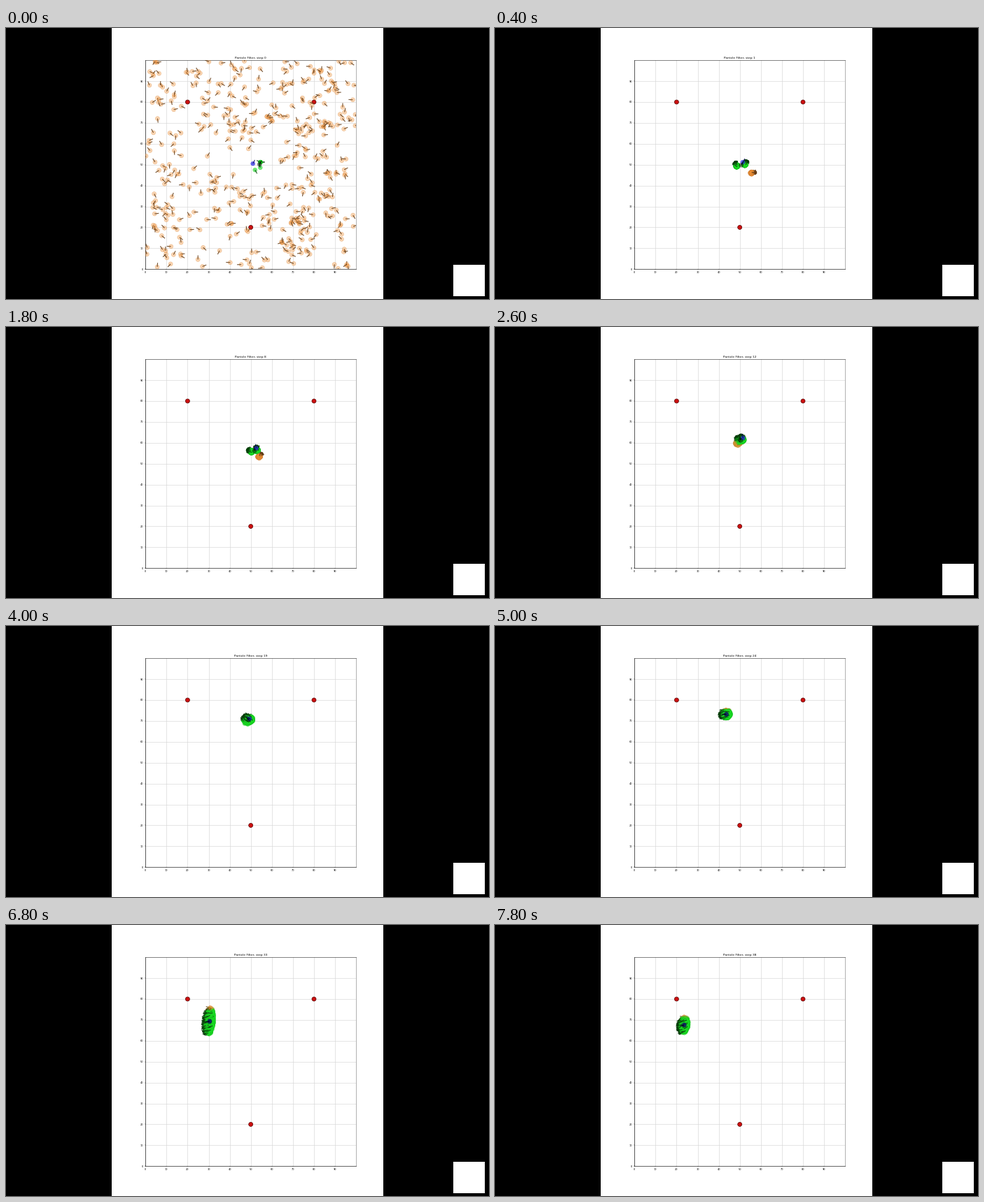
A matplotlib script that plays this animation: 690 by 388 pixels, repeating every 8000 ms.

```python
import numpy as np
import matplotlib.pyplot as plt
from matplotlib.animation import FuncAnimation
from matplotlib.collections import PathCollection
from matplotlib.patches import Circle, Rectangle
from matplotlib.path import Path

W, H, DPI = 690, 388, 100
PX = 72 / DPI
LEFT, TOP, RIGHT, BOTTOM = 199.2, 46.2, 500.2, 345.2
ORANGE, GREEN = np.array([0.96, 0.58, 0.22]), np.array([0.10, 0.88, 0.14])
BLUE, BLACK, RED = np.array([0.14, 0.14, 0.9]), np.zeros(3), "#cc1010"
N = 450
rng = np.random.default_rng(12)

# Robot way points: step, x, y
PATH = np.array([(0, 51, 50.5), (5, 52.8, 54.2), (12, 51.5, 62.3), (19, 49.4, 71),
                 (24, 43.6, 73.2), (28, 37.5, 71.3), (38, 23.6, 67.6)])
# Offsets of the three particle groups from the robot at steps 5 and 12
GROUPS = np.array([[(-2.8, -1.8), (-1.6, -1.3)],
                   [(1, -1.1), (-0.6, -0.9)],
                   [(4.2, -5.2), (-2.4, -2.6)]])
TURN = np.radians([60, 0, -50])

CIRCLE = np.linspace(0, 2 * np.pi, 17)
DISC = np.column_stack([np.cos(CIRCLE), np.sin(CIRCLE)])
LINE = 2.0


def ease(step, start, end):
    u = np.clip((step - start) / (end - start), 0, 1)
    return u * u * (3 - 2 * u)


def robot(step):
    keys, pts = PATH[:, 0], PATH[:, 1:]
    slopes = np.gradient(pts, keys, axis=0)
    i = min(np.searchsorted(keys, step, "right") - 1, len(keys) - 2)
    h = keys[i + 1] - keys[i]
    u = (step - keys[i]) / h
    return ((1 + 2 * u) * (1 - u) ** 2 * pts[i] + u * (1 - u) ** 2 * h * slopes[i]
            + u * u * (3 - 2 * u) * pts[i + 1] + u * u * (u - 1) * h * slopes[i + 1])


def heading(step):
    dx, dy = robot(min(step + 0.3, 38)) - robot(max(step - 0.3, 0))
    return np.arctan2(dy, dx) % (2 * np.pi)


def scatter():
    """Uniform particles with some clumps, sparse near the middle."""
    pts = rng.uniform(0, 100, (2 * N, 2))
    clumps = rng.uniform(0, 100, (40, 2))
    near = rng.random(2 * N) < 0.3
    pts[near] = rng.choice(clumps, near.sum()) + rng.normal(0, 2.4, (near.sum(), 2))
    pts = pts[np.hypot(pts[:, 0] - 52, pts[:, 1] - 46) > 10][:N]
    pts[-6:] = (54.6, 51.2)
    pts[-2:] = [(54.5, 48.6), (52, 47.5)]
    return pts


START = scatter()
START_DIR = rng.uniform(0, 2 * np.pi, N)
RADIUS = np.sqrt(rng.random(N))
PHASE = rng.uniform(0, 2 * np.pi, N)
GROUP = rng.choice(3, N, p=[0.42, 0.46, 0.12])


def particles(step):
    """Positions, directions and weights (0 orange, 1 green)."""
    if step == 0:
        return START, START_DIR, (np.arange(N) >= N - 6).astype(float)
    noise = np.random.default_rng(100 + step)
    u, v = RADIUS * [np.cos(PHASE), np.sin(PHASE)] + noise.normal(0, 0.06, (2, N))
    width = 0.6 + 1.3 * ease(step, 5, 19)
    height = 0.6 + ease(step, 5, 19) + 4.6 * np.exp(-((step - 33) / 5.5) ** 2)
    shift = np.column_stack([u * width + 0.07 * v * height, v * height])
    first, second = GROUPS[GROUP, 0], GROUPS[GROUP, 1]
    centre = first + (second - first) * np.clip((step - 5) / 7, 0, 1)
    centre = centre * (1 - ease(step, 12, 24))
    turn = TURN[GROUP] * (1 - ease(step, 5, 19))
    direction = heading(step) + turn + noise.normal(0, 0.22, N)
    weight = np.where(GROUP == 2, ease(step, 11, 16), 1.0)
    if step > 20:
        weight = weight * np.clip((1 - v) / 0.16, 0, 1)
    return robot(step) + centre + shift, direction, weight


def markers(step):
    paths, faces, edges, widths = [], [], [], []

    def add(pos, angle, rgb, alpha, line):
        tip = pos + LINE * np.array([np.cos(angle), np.sin(angle)])
        paths.extend([Path(pos + DISC, closed=True), Path([pos, tip])])
        faces.extend([(*rgb, alpha), (0, 0, 0, 0)])
        edges.extend([(*rgb * 0.85, 0.5), (*line, 0.85)])
        widths.extend([0.5 * PX, 1.15 * PX])

    pos, angles, weights = particles(step)
    for p, angle, w in zip(pos, angles, weights):
        rgb = ORANGE + (GREEN - ORANGE) * w
        add(p, angle, rgb, 0.38 + 0.24 * w, rgb * (0.4 - 0.12 * w))
    add(robot(step), heading(step), BLUE, 0.7, BLUE * 0.4)
    add(np.average(pos, axis=0, weights=weights), heading(step), BLACK, 0.42, BLACK)
    return paths, faces, edges, widths


fig = plt.figure(figsize=(W / DPI, H / DPI), dpi=DPI, facecolor="black")
back = fig.add_axes([0, 0, 1, 1])
back.set(xlim=(0, W), ylim=(H, 0))
back.axis("off")
back.add_patch(Rectangle((151, 0), 388, H, color="white", lw=0))
back.add_patch(Rectangle((639, 339), 45, 45, color="white", lw=0))

ax = fig.add_axes([LEFT / W, 1 - BOTTOM / H, (RIGHT - LEFT) / W, (BOTTOM - TOP) / H])
ax.set(xlim=(0, 100), ylim=(0, 100), xticks=range(0, 100, 10), yticks=range(0, 100, 10))
ax.grid(color="#d4d4d4", lw=0.6 * PX)
ax.tick_params(labelsize=3.54 * PX, length=1.3 * PX, width=0.4 * PX, pad=1.4 * PX)
for side, spine in ax.spines.items():
    spine.set_linewidth(0.6 * PX)
    spine.set_alpha({"right": 0.5, "top": 0.8}.get(side, 1))
title = ax.set_title("", fontsize=4.35 * PX, pad=2.2 * PX)
for x, y in [(20, 80), (80, 80), (50, 20)]:
    ax.add_patch(Circle((x, y), 1, fc=RED, ec="#5a0808", lw=0.7 * PX, zorder=2.5))
cloud = PathCollection([], zorder=3)
ax.add_collection(cloud, autolim=False)


def draw(frame):
    step = max(0, frame - 1)
    paths, faces, edges, widths = markers(step)
    cloud.set_paths(paths)
    cloud.set_facecolor(faces)
    cloud.set_edgecolor(edges)
    cloud.set_linewidth(widths)
    title.set_text(f"Particle Filter, step {step}")
    return cloud, title


anim = FuncAnimation(fig, draw, frames=40, interval=200, repeat=True, repeat_delay=0,
                     init_func=lambda: draw(0), blit=False)
plt.show()
```
